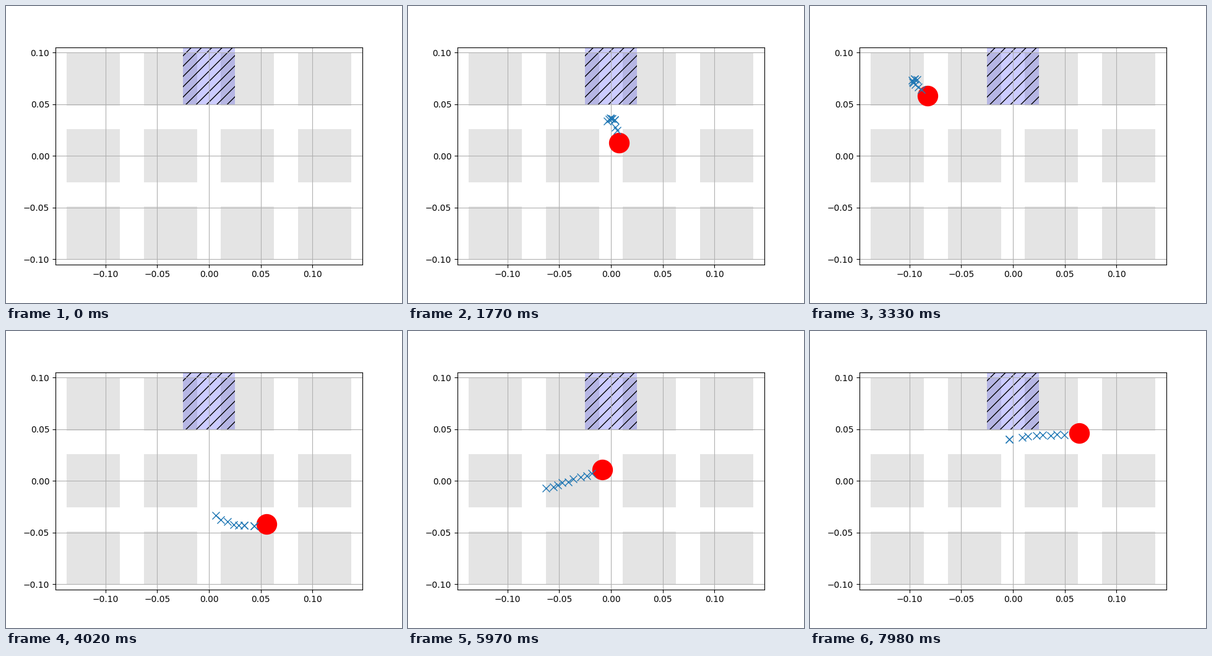
A matplotlib script that plays this animation: 640 px wide and 480 px high, repeating every 8000 ms.

```python
import numpy as np
import matplotlib.pyplot as plt
from matplotlib.animation import FuncAnimation
from matplotlib.patches import Rectangle

LOOP_MS = 8000
STEPS = 267
TRAIL = 9          # measurements kept on screen
LAG = 2            # steps by which measurements trail the ball
NOISE = 1.5        # pixels
REPEAT = 0.13      # chance that a reading is stale
SCALE = 496 / 0.297
CENTRE = np.array([328, 242.4])

# Turning points of the ball: step, x, y (stage pixels)
KEYS = np.array([
    (1, 104, 378), (15, 262, 312), (22, 333, 281), (29, 302, 268),
    (37, 294, 243), (53, 331, 182), (71, 346, 313), (88, 286, 173),
    (103, 166, 120), (112, 197, 152), (124, 339, 299), (134, 421, 312),
    (141, 447, 296), (153, 393, 262), (163, 305, 226), (181, 197, 254),
    (189, 228, 252), (199, 314, 224), (212, 398, 178), (226, 300, 168),
    (240, 187, 206), (256, 321, 174), (266, 435, 165)], float)


def ball_path(t):
    """Cubic Hermite curve through the turning points, in plane units."""
    kt, pts = KEYS[:, 0], KEYS[:, 1:]
    slope = np.gradient(pts, kt, axis=0)
    t = np.maximum(t, kt[0])
    i = np.clip(np.searchsorted(kt, t, side="right") - 1, 0, len(kt) - 2)
    h = (kt[i + 1] - kt[i])[:, None]
    u = (t - kt[i])[:, None] / h
    px = ((2 * u**3 - 3 * u**2 + 1) * pts[i]
          + (u**3 - 2 * u**2 + u) * h * slope[i]
          + (3 * u**2 - 2 * u**3) * pts[i + 1]
          + (u**3 - u**2) * h * slope[i + 1])
    return (px - CENTRE) * (1, -1) / SCALE


def measure():
    """Delayed, noisy readings with an occasional repeated value."""
    rng = np.random.default_rng(4)
    pts = ball_path(np.arange(STEPS) - LAG)
    pts += rng.uniform(-NOISE, NOISE, pts.shape) / SCALE
    for k in range(2, STEPS):
        if rng.random() < REPEAT:
            pts[k] = pts[k - 1]
    return pts


ball_pos = ball_path(np.arange(STEPS))
measured = measure()

fig, ax = plt.subplots(figsize=(6.4, 4.8), dpi=100)
ax.set_aspect("equal")
ax.set_xlim(-0.1485, 0.1485)
ax.set_ylim(-0.105, 0.105)
ticks = np.arange(-2, 3) * 0.05
ax.set_xticks(ticks)
ax.set_yticks(ticks)
ax.grid(True)

ax.add_patch(Rectangle((-0.025, 0.05), 0.05, 0.06, facecolor="blue",
                       alpha=0.2, hatch="//"))
PITCH, SIDE = 0.0747, 0.0515
for col in (-1.5, -0.5, 0.5, 1.5):
    for row in (-1, 0, 1):
        corner = (col * PITCH - SIDE / 2, row * PITCH - SIDE / 2)
        ax.add_patch(Rectangle(corner, SIDE, SIDE, facecolor="black",
                               alpha=0.105, linewidth=0))

ball, = ax.plot([], [], "o", color="red", markersize=23)
marks, = ax.plot([], [], "x", color="C0", markersize=8)


def draw(step):
    first = max(1, step - TRAIL + 1)
    ball.set_data(*ball_pos[max(1, step):step + 1].T)
    marks.set_data(*measured[first:step + 1].T)
    return ball, marks


anim = FuncAnimation(fig, draw, frames=STEPS, interval=LOOP_MS / STEPS,
                     init_func=lambda: draw(0), repeat=True, repeat_delay=0)
plt.show()
```
